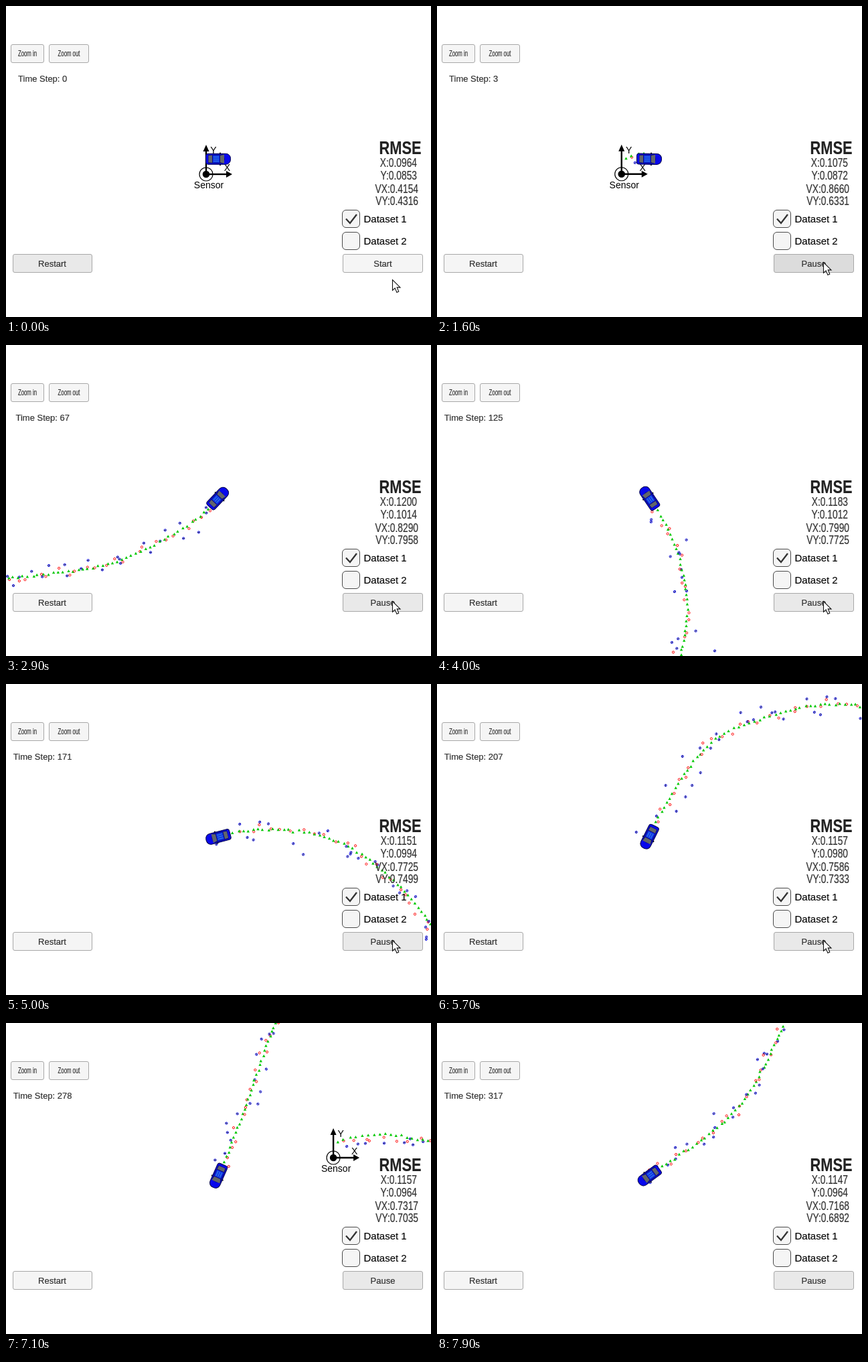
Animation, 635 px wide and 464 px high, one loop 8 s. Source, as an HTML page with a canvas:

```html
<!DOCTYPE html>
<html lang="en">
<head>
<meta charset="utf-8">
<title>Sensor tracking simulator</title>
<style>
html, body { margin: 0; width: 100%; height: 100%; overflow: hidden; background: #fff; }
canvas, svg { position: absolute; left: 0; top: 0; width: 635px; height: 464px; }
text { font: 13px "Liberation Sans", Arial, sans-serif; fill: #323232; stroke: #323232; stroke-width: .2px; text-anchor: middle; }
.button { fill: #f5f5f5; stroke: #a8a8a8; }
.box { fill: #f5f5f5; stroke: #4a4a4a; }
.narrow { font-size: 12px; }
.stat { font-size: 17.5px; text-anchor: end; }
.title { font-size: 28px; font-weight: bold; fill: #222; }
.label { font-size: 15px; text-anchor: start; fill: #000; }
</style>
</head>
<body>
<canvas id="world" width="635" height="464"></canvas>
<svg viewBox="0 0 635 464">
  <rect class="button" x="7.5" y="57.5" width="49" height="27" rx="2.5"/>
  <rect class="button" x="64.5" y="57.5" width="59" height="27" rx="2.5"/>
  <rect class="button" id="restart" x="10.5" y="370.5" width="118" height="27" rx="2.5"/>
  <rect class="button" id="start" x="503.5" y="370.5" width="119" height="27" rx="2.5"/>
  <text class="narrow" transform="translate(32 75) scale(.65 1)">Zoom in</text>
  <text class="narrow" transform="translate(94 75) scale(.65 1)">Zoom out</text>
  <text id="step" x="54.7" y="113"></text>
  <text x="69" y="389">Restart</text>
  <text id="startLabel" x="563" y="389"></text>

  <text class="title" transform="translate(589 221) scale(.78 1)">RMSE</text>
  <text class="stat" transform="translate(614 240) scale(.79 1)"></text>
  <text class="stat" transform="translate(614 259) scale(.79 1)"></text>
  <text class="stat" transform="translate(616 279) scale(.79 1)"></text>
  <text class="stat" transform="translate(616 297) scale(.79 1)"></text>

  <rect class="box" x="502.5" y="304.5" width="26" height="26" rx="5.5"/>
  <rect class="box" x="502.5" y="337.5" width="26" height="26" rx="5.5"/>
  <path d="M508 317.5l6 6.5 10-13" fill="none" stroke="#333" stroke-width="2.3"/>
  <text class="label" x="534.5" y="323">Dataset 1</text>
  <text class="label" x="534.5" y="356">Dataset 2</text>

  <path id="cursor" d="M.5 .5V16.2L4.2 12.9 6.9 19.2 9.8 18 7.2 11.9H12Z" fill="#fff" stroke="#111" stroke-width="1.1"/>
</svg>
<script>
const byId = id => document.getElementById(id);
const ctx = byId('world').getContext('2d');
const statLines = document.querySelectorAll('.stat');
const statNames = ['X', 'Y', 'VX', 'VY'];

const LOOP = 8000, TICK = 100, START = 15, LAST_STEP = 317;
const CAR = { x: 317, y: 228 };
const SENSOR = { x: -18, y: 23 };

// Key readouts: tick, step, RMSE of x, y, vx, vy
const idle = [0, 0, .0964, .0853, .4154, .4316];
const progress = [
  [16, 3, .1075, .0872, .8660, .6331],
  [29, 67, .1200, .1014, .8290, .7958],
  [40, 125, .1183, .1012, .7990, .7725],
  [50, 171, .1151, .0994, .7725, .7499],
  [65, 249, .1164, .0964, .7428, .7143],
  [79, LAST_STEP, .1147, .0964, .7168, .6892]
];

// Key points of the drive: step, x, y
const route = [
  [0, 0, 0], [22, 170, 0], [46, 347, -32], [67, 484, -121],
  [93, 572, -287], [108, 579, -399], [125, 526, -521], [144, 419, -620],
  [157, 323, -648], [171, 218, -638], [188, 97, -581], [216, -17, -386],
  [249, -112, -158], [277, -187, 43], [296, -258, 170], [LAST_STEP, -387, 267]
];

function segment(rows, key) {
  let i = 0;
  while (i < rows.length - 2 && rows[i + 1][0] <= key) i++;
  return i;
}

function lerpRow(rows, key) {
  const i = segment(rows, key), a = rows[i], b = rows[i + 1];
  const u = Math.max(0, (key - a[0]) / (b[0] - a[0]));
  return a.map((v, n) => v + (b[n] - v) * u);
}

// Cubic Hermite curve through the route.
function position(step) {
  const i = segment(route, step), a = route[i], b = route[i + 1];
  const span = b[0] - a[0], u = (step - a[0]) / span;
  const slope = (n, axis) => {
    const p = route[Math.max(n - 1, 0)], q = route[Math.min(n + 1, route.length - 1)];
    return (q[axis] - p[axis]) / (q[0] - p[0]);
  };
  const along = axis => {
    const m = slope(i, axis) * span, n = slope(i + 1, axis) * span;
    const d = b[axis] - a[axis];
    return a[axis] + u * (m + u * (3 * d - 2 * m - n + u * (m + n - 2 * d)));
  };
  return { x: along(1), y: along(2) };
}

function heading(step) {
  const now = position(step), before = position(Math.max(step - 2, 0));
  return Math.atan2(now.y - before.y, now.x - before.x);
}

function random(n) {
  const v = Math.sin(n * 12.9898 + 4.1) * 43758.5453;
  return v - Math.floor(v);
}
const gauss = n => (random(n) + random(n + .31) + random(n + .67) - 1.5) * 2;

// The estimate starts off the path and settles; lidar and radar take turns.
const samples = Array.from({ length: LAST_STEP + 1 }, (_, k) => {
  const p = position(k);
  const drift = Math.exp(-k / 6), settle = Math.exp(-Math.max(0, k - 9) / 7);
  const estimate = {
    x: p.x - 12 * drift + gauss(k + 900) * .8,
    y: p.y - 14 * (1 - Math.exp(-k / 3)) * settle + gauss(k + 1300) * .9
  };
  const radar = k % 2 === 1;
  if (!radar) {
    return { estimate, radar, seen: { x: p.x + gauss(k + 100) * 4.5, y: p.y + gauss(k + 500) * 4.5 } };
  }
  const dx = p.x - SENSOR.x, dy = p.y - SENSOR.y;
  const bearing = Math.atan2(dy, dx) + gauss(k + 100) * .03;
  const range = Math.hypot(dx, dy) + gauss(k + 500) * 9;
  const seen = { x: SENSOR.x + range * Math.cos(bearing), y: SENSOR.y + range * Math.sin(bearing), bearing };
  return { estimate, radar, seen };
});

function polygon(fill, ...points) {
  ctx.beginPath();
  for (const [x, y] of points) ctx.lineTo(x, y);
  ctx.closePath();
  ctx.fillStyle = fill;
  ctx.fill();
}

function disc(x, y, r) {
  ctx.beginPath();
  ctx.arc(x, y, r, 0, 7);
}

function line(x1, y1, x2, y2) {
  ctx.beginPath();
  ctx.moveTo(x1, y1);
  ctx.lineTo(x2, y2);
  ctx.stroke();
}

function drawSensor() {
  const { x, y } = SENSOR;
  ctx.strokeStyle = ctx.fillStyle = '#000';
  ctx.lineWidth = 1.2;
  disc(x, y, 10);
  ctx.stroke();
  disc(x, y, 5.3);
  ctx.fill();
  ctx.lineWidth = 2.4;
  line(x, y, x, y - 35);
  line(x, y, x + 32, y);
  polygon('#000', [x - 4.5, y - 34], [x + 4.5, y - 34], [x, y - 44]);
  polygon('#000', [x + 30, y - 5], [x + 30, y + 5], [x + 39, y]);
  ctx.font = '14px "Liberation Sans", Arial, sans-serif';
  ctx.textAlign = 'center';
  ctx.fillText('Y', x + 11, y - 31);
  ctx.fillText('X', x + 31.5, y - 5);
  ctx.fillText('Sensor', x + 4, y + 21);
}

function drawSample({ estimate, radar, seen }) {
  ctx.lineWidth = 1;
  ctx.strokeStyle = radar ? '#00f' : '#f00';
  disc(seen.x, seen.y, 1.6);
  ctx.stroke();
  if (radar) {
    const c = 1.8 * Math.cos(seen.bearing), s = 1.8 * Math.sin(seen.bearing);
    ctx.strokeStyle = '#224';
    line(seen.x - c, seen.y - s, seen.x + c, seen.y + s);
  }
  const { x, y } = estimate;
  polygon('#00c800', [x - 2.2, y + 1.8], [x + 2.2, y + 1.8], [x, y - 2.2]);
}

function drawCar(angle) {
  ctx.save();
  ctx.translate(CAR.x, CAR.y + .3);
  ctx.rotate(angle);
  polygon('#111', [2, -9.6], [4, -9.6], [4, 9.6], [2, 9.6]);
  ctx.beginPath();
  ctx.roundRect(-18.5, -8, 37, 16, [3.5, 7, 7, 3.5]);
  ctx.fillStyle = '#0808ec';
  ctx.fill();
  ctx.strokeStyle = '#08084a';
  ctx.lineWidth = 1;
  ctx.stroke();
  polygon('#0a0a80', [-15, -6.4], [8, -7], [10, 0], [8, 7], [-15, 6.4]);
  for (const [left, right, flare] of [[-14.5, -9, 0], [3, 9, 1]]) {
    polygon('#62666a', [left, -5], [right, -5.5 - flare], [right, 5.5 + flare], [left, 5]);
  }
  polygon('#0c30ee', [-8, -5.5], [2, -5.5], [2, 5.5], [-8, 5.5]);
  ctx.strokeStyle = '#3f90d0';
  for (const y of [-3, 0, 3]) line(-7, y, 1, y);
  ctx.restore();
}

function drawWorld(step) {
  const here = position(step);
  ctx.clearRect(0, 0, 635, 464);
  ctx.save();
  ctx.translate(CAR.x - here.x, CAR.y - here.y);
  drawSensor();
  if (step > 0) samples.slice(0, step + 1).forEach(drawSample);
  ctx.restore();
  drawCar(heading(step));
}

function drawPanel(tick, step, errors) {
  const running = tick >= START;
  byId('step').textContent = 'Time Step: ' + step;
  byId('startLabel').textContent = running ? 'Pause' : 'Start';
  byId('restart').style.fill = running ? '#f5f5f5' : '#e9e9e9';
  byId('start').style.fill = !running ? '#f5f5f5' : tick < 18 ? '#dcdcdc' : '#e9e9e9';
  statLines.forEach((el, i) => el.textContent = `${statNames[i]}:${errors[i].toFixed(4)}`);
  const reach = Math.min(1, Math.max(0, (tick - 7) / 4));
  byId('cursor').setAttribute('transform', `translate(577 ${408 - 26 * reach})`);
  byId('cursor').style.display = tick < 70 ? '' : 'none';
}

// The simulator stalls briefly twice, then skips every third tick.
function isStalled(tick) {
  if (tick < 45) return tick === 25 || tick === 26 || tick === 41;
  return tick % 3 === (tick < 65 ? 1 : 0);
}

let shown = -1;
function frame(now) {
  let tick = Math.floor(now % LOOP / TICK);
  while (isStalled(tick)) tick--;
  if (tick !== shown) {
    shown = tick;
    const [, exact, ...errors] = tick < START ? idle : lerpRow(progress, tick);
    const step = Math.round(exact);
    drawWorld(step);
    drawPanel(tick, step, errors);
  }
  requestAnimationFrame(frame);
}
frame(0);
</script>
</body>
</html>
```
